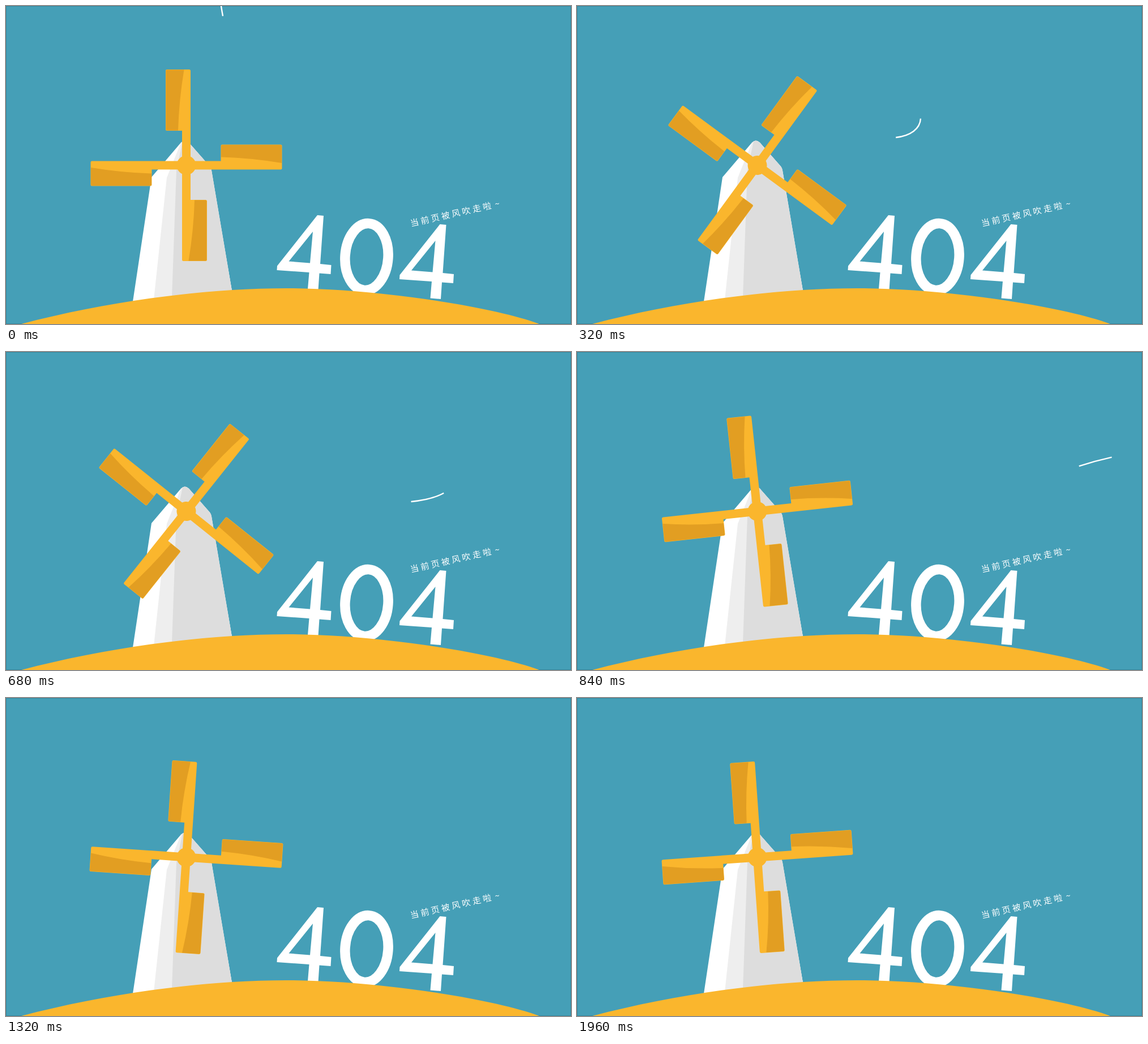
An HTML page for the animation above (2000 ms loop, 998 by 561 pixels).

```html
<!DOCTYPE html>
<html lang="zh">
<head>
<meta charset="utf-8">
<title>404</title>
<style>
  html, body { margin: 0; width: 100%; height: 100%; overflow: hidden; background: #459fb7; }
  svg { display: block; width: 998px; height: 561px; }
  .caption {
    font: 500 15px "Noto Sans CJK SC", "Noto Sans CJK", "Noto Sans", sans-serif;
    letter-spacing: 3.75px;
    fill: #fff;
  }
</style>
</head>
<body>
<svg viewBox="0 0 998 561">
  <defs>
    <g id="blade">
      <path fill="#fab62d" d="M-34-169H5Q7.500-169 7.500-166.500V0H-7.500V-61H-34Q-36.500-61-36.500-63.500V-166.500Q-36.500-169-34-169Z"/>
      <path fill="#e29e22" d="M-34-168.500H-4Q-13-115-14.500-61.500H-34Q-36-61.500-36-63.500V-166.500Q-36-168.500-34-168.500Z"/>
    </g>
    <path id="four" fill="#fff" fill-rule="evenodd"
      d="M550 369L561 370L555 455L574.500 457L573.500 473L553.500 471.500L551.500 501L533 499.500L535.500 470L478.500 466L479 458.500ZM542 398L499.500 450.500L537 453.500Z"/>
  </defs>

  <rect width="998" height="561" fill="#459fb7"/>
  <rect x=".5" y=".5" width="997" height="560" fill="none" stroke="#35859b"/>

  <path id="wind" fill="none" stroke="#fff" stroke-width="2.4"/>

  <g id="tower">
    <path fill="#fff" d="M223 528L257 302L309 241Q316 234 323 241L360 283Q362 285 363 290L400 508Z"/>
    <path fill="#eee" d="M260 528L284 303L309 241Q316 234 323 241L360 283L400 508Z"/>
    <path fill="#ddd" d="M292.500 528L301 290L312 238.500Q318 236 323 241L360 283Q362 285 363 290L400 508Z"/>
  </g>

  <g role="img" aria-label="404">
    <use href="#four"/>
    <ellipse cx="637" cy="442.500" rx="38" ry="59" fill="none" stroke="#fff" stroke-width="17.500" transform="rotate(4 637 442.500)"/>
    <use href="#four" x="216.500" y="16"/>
  </g>

  <path fill="#fab62d" d="M27 561C180 521 350 498 495 498C650 498 860 530 942 561Z"/>

  <text class="caption" transform="translate(721.500 382) rotate(-12.700)" x="-7.500" y="5.500">当前页被风吹走啦<tspan dx="3">~</tspan></text>

  <g id="sails">
    <use href="#blade"/>
    <use href="#blade" transform="rotate(90)"/>
    <use href="#blade" transform="rotate(180)"/>
    <use href="#blade" transform="rotate(270)"/>
    <circle r="17" fill="#fab62d"/>
  </g>
</svg>
<script>
const STEP = 40, LOOP = 2000;
const sails = document.getElementById('sails');
const wind = document.getElementById('wind');

// [step, angle, degrees per step]
const turns = [
  [0, 0, 2.2], [8, 36.2, 7.6], [17, 128.6, 11.5], [25, 214.1, 9],
  [33, 273.9, 6.5], [41, 319.3, 5], [50, 360, 4]
];

// Cubic Hermite between neighbouring keys
function angleAt(step) {
  const i = turns.findIndex((key, n) => n > 0 && step <= key[0]);
  const [s0, a0, v0] = turns[i - 1], [s1, a1, v1] = turns[i];
  const span = s1 - s0, u = (step - s0) / span, w = 1 - u;
  return a0 * w * w * (1 + 2 * u) + a1 * u * u * (3 - 2 * u)
    + span * u * w * (v0 * w - v1 * u);
}

const entry = 'M380 0C400 130 470 245 563 232';
const swirl = 'C590 229 607 216 607 197C607 170 592 153 568 153' +
  'C540 153 526 175 528 198C531 235 580 262 650 265C672 266 695 266 715 264';
const exit = 'C738 262 758 257 773 249C850 215 920 175 1080 170';

function lengthOf(d) {
  wind.setAttribute('d', d);
  return wind.getTotalLength();
}
const entryLength = lengthOf(entry);
const gustSpeed = (lengthOf(entry + swirl) - entryLength) / 9;
const windLength = lengthOf(entry + swirl + exit);
wind.setAttribute('stroke-dasharray', '60 3000');

function draw(time) {
  const step = Math.floor((time % LOOP) / STEP);
  sails.setAttribute('transform', `translate(318.5 281) rotate(${angleAt(step)})`);

  const tail = entryLength + (step - 8) * gustSpeed;
  const visible = tail + 60 > 0 && tail < windLength;
  wind.setAttribute('visibility', visible ? 'visible' : 'hidden');
  wind.setAttribute('stroke-dashoffset', -tail);
}

const start = performance.now();
function tick() {
  draw(performance.now() - start);
  requestAnimationFrame(tick);
}
tick();
</script>
</body>
</html>
```
